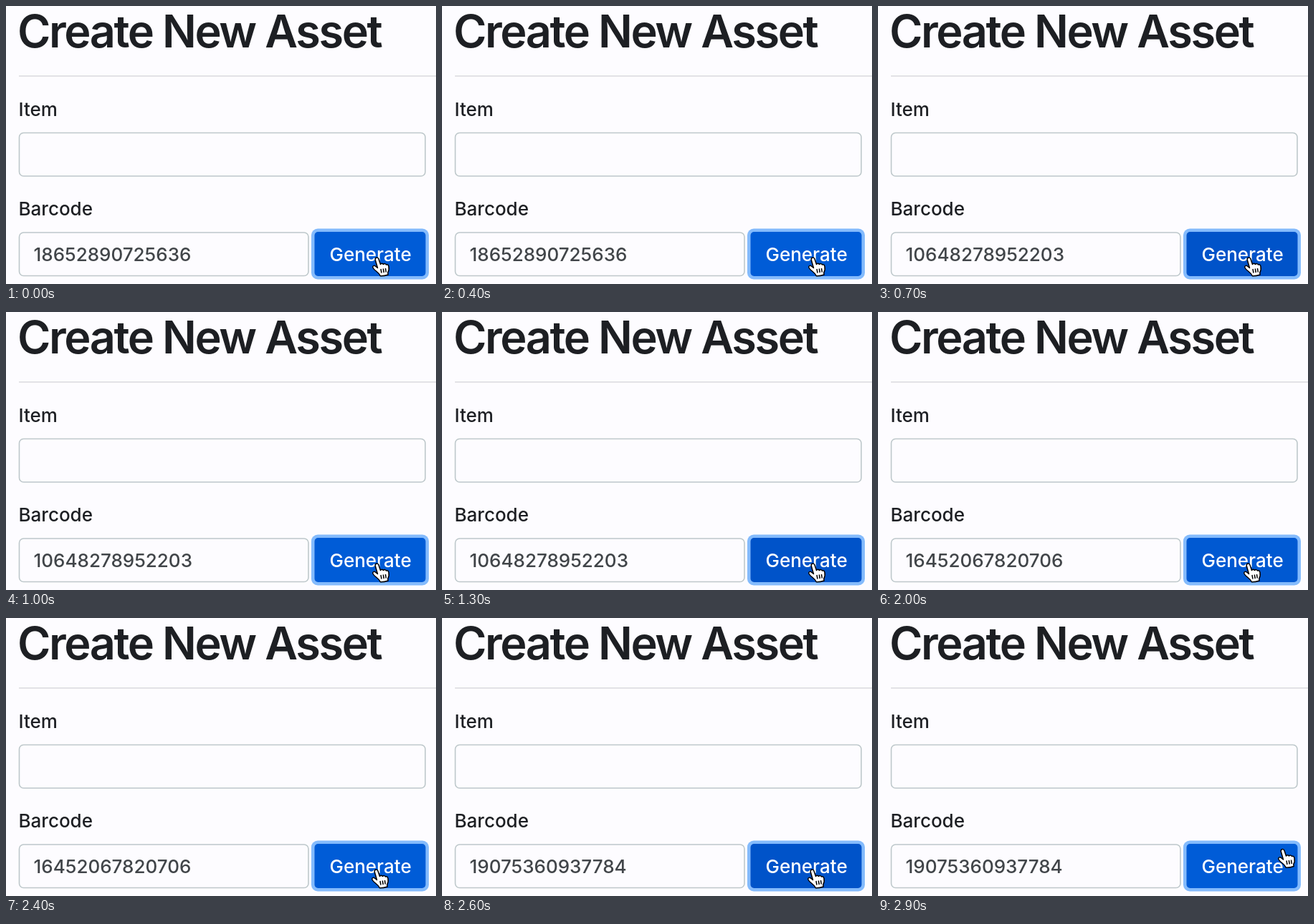
Recreate the animation shown at these times as an HTML page. Size 600x389 px, loop 3 s.

```html
<!DOCTYPE html>
<html lang="en">
<head>
<meta charset="utf-8">
<title>Create New Asset</title>
<style>
html, body { margin: 0; width: 100%; height: 100%; overflow: hidden; background: #fdfcff; }
svg { display: block; width: 600px; height: 389px; }
text { font: 450 26px Inter, Roboto, sans-serif; font-optical-sizing: none; fill: #1d1f23; }
.title { font-size: 63px; font-weight: 570; letter-spacing: -2.4px; }
.field { fill: #fdfcff; stroke: #bec8cb; stroke-width: 1.6; }
#code { fill: #414549; }
.caption { fill: #fff; }
.hand { fill: #fff; stroke: #000; stroke-width: 1.5; stroke-linejoin: round; }
</style>
</head>
<body>
<svg viewBox="0 0 600 389">
  <text class="title" x="16" y="58">Create New Asset</text>
  <path d="M18 98H600" stroke="#dadade" stroke-width="1.6"/>
  <text x="17.5" y="154">Item</text>
  <rect class="field" x="18.5" y="177.5" width="566.5" height="60.5" rx="6"/>
  <text x="17.5" y="293">Barcode</text>
  <rect class="field" x="18.5" y="317" width="403.5" height="60.5" rx="6"/>
  <text id="code" x="38.5" y="357"></text>
  <rect x="426" y="311.5" width="164" height="71" rx="9" fill="#84bbfc"/>
  <rect id="button" x="430.5" y="316" width="155" height="62" rx="5"/>
  <text class="caption" x="451.5" y="357">Generate</text>
  <g id="pointer" class="hand">
    <path d="M-2.3 2.5C-2.5-1 1.5-1.5 2.5 1.5L5 9Q6.5 6.5 9 9Q11.5 7 13 9.5Q16 8.5 16.5 12Q17.5 17 15.3 20.5L15.6 23.5Q10 25.5 5 25.3Q3 21.5-1 18.5Q-5.5 15-5.8 12.5Q-4.5 9.5-1.5 12L1 14Z"/>
    <path d="M5.5 15.5l1 5.5M8.8 15l1 5.5M12 14.5l.8 5.5" fill="none"/>
  </g>
</svg>
<script>
const LOOP = 3000, STEP = 100;
const codes = ["18652890725636", "10648278952203", "18324938251723", "16452067820706", "19075360937784"];
const clicks = [[600, 700], [1200, 1400], [1800, 1900], [2400, 2600]]; // press, release
const el = id => document.getElementById(id);
const clamp = v => Math.max(0, Math.min(1, v));
const ease = v => v * v * (3 - 2 * v);
const mix = (a, b, k) => a + (b - a) * k;

function draw(now) {
  const t = Math.floor(now % LOOP / STEP) * STEP;
  const code = codes[clicks.filter(c => t >= c[1]).length];
  if (el("code").textContent !== code) el("code").textContent = code;

  const dark = Math.max(...clicks.map(([down, up]) =>
    clamp((t - down) / 100) * clamp(1 - (t - up) / 150)));
  el("button").setAttribute("fill", `rgb(0 ${mix(92, 83, dark)} ${mix(215, 201, dark)})`);

  const leave = ease(clamp((t - 2600) / 300));
  const x = mix(t < 1800 ? 517.5 : 516.5, 564.5, leave), y = mix(352.5, 324, leave);
  el("pointer").setAttribute("transform", `translate(${x} ${y})`);
  requestAnimationFrame(draw);
}
draw(0);
</script>
</body>
</html>
```
